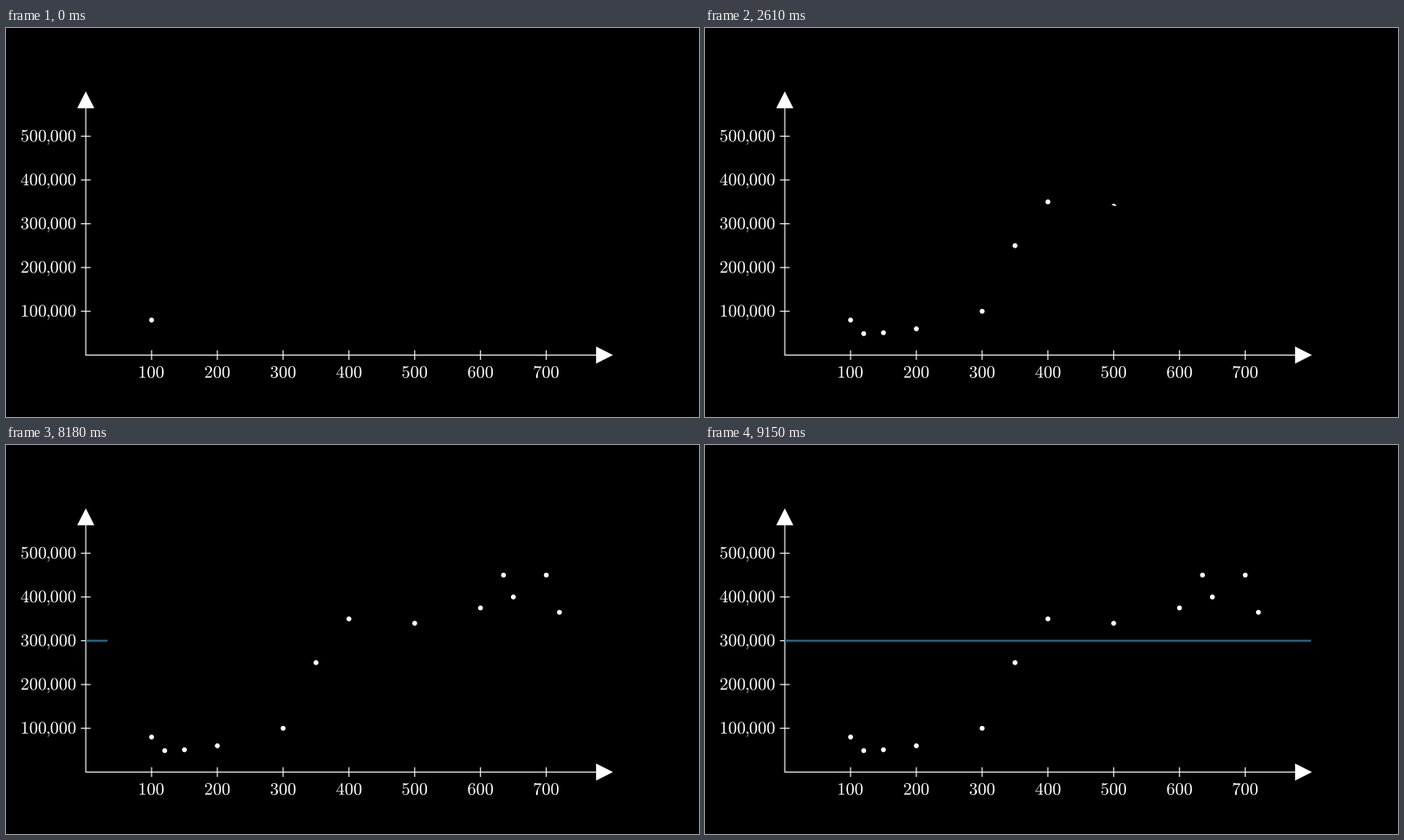
A matplotlib script that plays this animation: 800 px wide and 450 px high, repeating every 9240 ms.

```python
import numpy as np
import matplotlib.pyplot as plt
from matplotlib.animation import FuncAnimation
from matplotlib.patches import PathPatch, Polygon
from matplotlib.textpath import TextPath
from matplotlib.transforms import Affine2D

W, H, DPI = 800, 450, 100
LOOP, STEP = 9240, 20            # ms
X0, Y0 = 92.1, 378.35            # axes origin in pixels from the top left
UX, UY = 75.94, 50.63            # pixels per 100 and per 100,000
EM, RADIUS = 20.2, 2.82
WHITE, BLUE = "#ffffff", "#20708c"

# In order of appearance; the second value is in thousands
POINTS = [(100, 80), (120, 49), (150, 51), (200, 60), (300, 100),
          (350, 250), (400, 350), (500, 340), (600, 375), (650, 400),
          (700, 450), (635, 450), (720, 365)]

plt.rcParams["mathtext.fontset"] = "cm"
fig = plt.figure(figsize=(W / DPI, H / DPI), dpi=DPI, facecolor="black")
ax = fig.add_axes([0, 0, 1, 1])
ax.set_xlim(0, W)
ax.set_ylim(H, 0)
ax.axis("off")


def px(v):
    return X0 + UX * v / 100


def py(k):
    return Y0 - UY * k / 100


def stroke(xs, ys, width=1.15, color=WHITE, z=1):
    line, = ax.plot(xs, ys, color=color, lw=width * 72 / DPI, zorder=z,
                    solid_capstyle="butt", snap=False)
    return line


def fill(pts, z=2):
    return ax.add_patch(Polygon(pts, closed=True, fc=WHITE, lw=0, zorder=z))


def label(text, x, base, align):
    """Set text by its inked edges: align 0.5 centres it, 1 ends it at x."""
    path = TextPath((0, 0), "$\\mathrm{" + text + "}$", size=EM)
    box = path.get_extents()
    left = x - box.x0 - align * box.width
    path = path.transformed(Affine2D().scale(1, -1).translate(left, base))
    ax.add_patch(PathPatch(path, fc=WHITE, lw=0, zorder=2))


def smooth(a, k=10):
    a = np.clip(a, 0, 1)
    low = 1 / (1 + np.exp(k / 2))
    return np.clip((1 / (1 + np.exp(-k * (a - 0.5))) - low) / (1 - 2 * low), 0, 1)


def arc(x, y, part):
    th = np.linspace(0, 2 * np.pi * part, 49)
    return np.column_stack([x + RADIUS * np.cos(th), y - RADIUS * np.sin(th)])


# Axes
stroke([X0, 690], [Y0, Y0])
stroke([X0, X0], [Y0 + 0.55, 85])
fill([(X0, 73.2), (X0 - 9.9, 92.8), (X0 + 9.9, 92.8)])
fill([(700.7, Y0), (681.2, Y0 - 9.9), (681.2, Y0 + 9.9)])

for n in range(1, 8):
    x = px(100 * n)
    stroke([x, x], [Y0 - 5.6, Y0 + 5.6])
    label(f"{n}00", x, 404.6, 0.5)
for n in range(1, 6):
    y = py(100 * n)
    stroke([X0 - 5.6, X0 + 5.6], [y, y])
    label(f"{n}00" + r"\hspace{-0.05}{,}\hspace{-0.05}000", 80.3, y + 6.1, 1)

dots = [fill(arc(px(v), py(k), 1), 3) for v, k in POINTS]
level = stroke([], [], 2.25, BLUE, 4)


def clock(n):
    """Scene time in seconds: 33 pictures a second taken from a 60 Hz clock."""
    pic = int((n * STEP + 15) * 33 / 1000)
    return (round(pic * 60 / 33) + 1) / 60


def update(n):
    t = clock(n)
    for i, (dot, (v, k)) in enumerate(zip(dots, POINTS)):
        part = 1 if i == 0 else smooth((t - 0.75 - 0.25 * i) / 0.25)
        dot.set_visible(part > 0)
        dot.set_xy(arc(px(v), py(k), part))
    part = smooth(t - 8)
    level.set_visible(part > 0)
    level.set_data([X0, X0 + 8 * UX * part], [py(300)] * 2)
    return dots + [level]


anim = FuncAnimation(fig, update, frames=LOOP // STEP, interval=STEP,
                     repeat=True, repeat_delay=0, blit=False)
plt.show()
```
